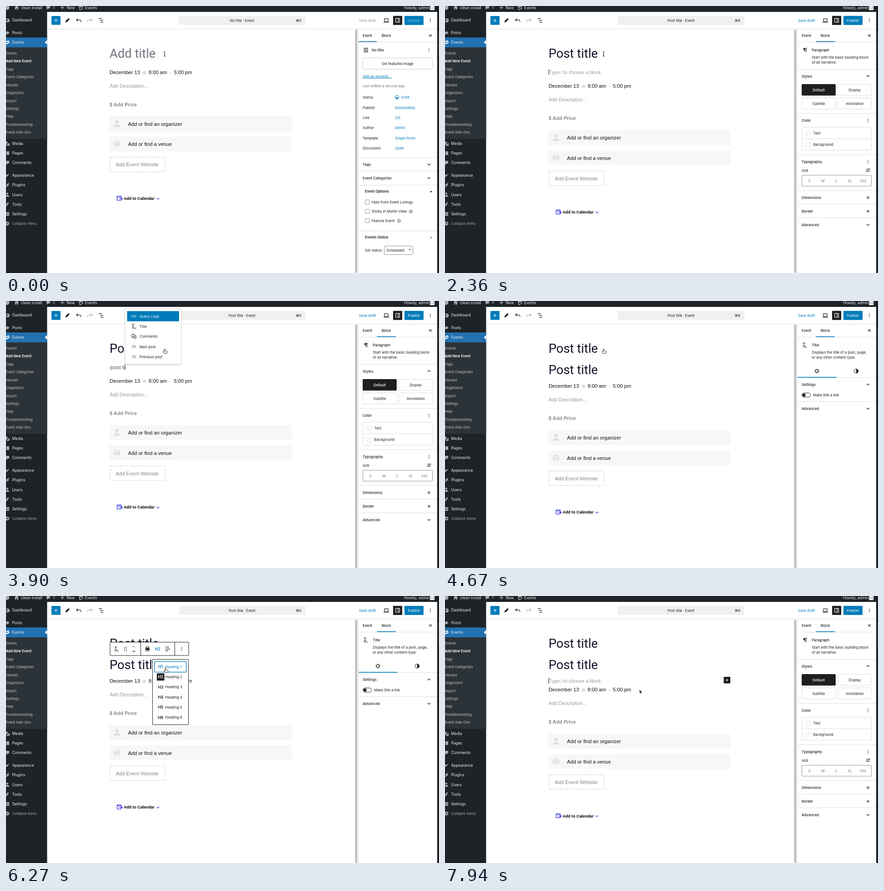
An HTML page for the animation above (8 s loop, 953 by 588 pixels).

```html
<!DOCTYPE html>
<html lang="en">
<head>
<meta charset="utf-8">
<title>Event editor</title>
<style>
html, body { margin: 0; width: 100%; height: 100%; overflow: hidden; background: #fff; }
svg { display: block; width: 953px; height: 588px; }
text { font: 7.8px Inter, sans-serif; fill: #1e1e1e; white-space: pre; }
.m { font-weight: 500; } .b { font-weight: 600; } .c { text-anchor: middle; }
.menu { font-size: 8.4px; fill: #f0f0f1; } .sub { font-size: 7.7px; fill: #c3c4c7; }
.w { fill: #fff; } .blue { fill: #007cba; } .grey { fill: #757575; } .pale { fill: #949494; } .dim { fill: #a7aaad; }
.body { font: 11.15px "Liberation Sans", Arial, sans-serif; fill: #111; }
.light { font: 11.2px "Liberation Sans", Arial, sans-serif; fill: #9b9ea4; letter-spacing: -.28px; }
.slash { font: 11.4px "Liberation Sans", Arial, sans-serif; fill: #555; }
.price { font: bold 11px "Liberation Sans", Arial, sans-serif; fill: #858b92; }
.cal { font: bold 8.8px "Liberation Sans", Arial, sans-serif; fill: #000; }
.title { font: 27.4px Roboto, sans-serif; fill: #14142b; }
.ghost { fill: #75757f; }
</style>
</head>
<body>
<svg viewBox="0 0 953 588"><g id="base"></g><g id="live"></g></svg>
<script>
const INK = '#1e1e1e', BLUE = '#007cba', LINE = '#e0e0e0';

const T = (x, y, s, c = '') => `<text x="${x}" y="${y}" dy=".36em" class="${c}">${s}</text>`;
const R = (x, y, w, h, fill, stroke = 'none', r = 0, more = '') =>
  `<rect x="${x}" y="${y}" width="${w}" height="${h}" rx="${r}" fill="${fill}" stroke="${stroke}" ${more}/>`;
const P = (x, y, d, stroke = INK, w = 1, fill = 'none') =>
  `<path transform="translate(${x} ${y})" d="${d}" stroke="${stroke}" stroke-width="${w}" fill="${fill}"/>`;
const F = (x, y, d, fill = INK) => P(x, y, d, 'none', 0, fill);
const C = (x, y, r, fill, stroke = 'none') => `<circle cx="${x}" cy="${y}" r="${r}" fill="${fill}" stroke="${stroke}"/>`;
const H = (x, y, w, col = LINE) => R(x, y, w, 1, col);
const dots = (x, y) => [-3, 0, 3].map(d => C(x, y + d, .85, INK)).join('');
const down = (x, y, col = INK) => P(x, y, 'M-3-1.5 0 1.5 3-1.5', col, 1.1);
const up = (x, y, col = INK) => P(x, y, 'M-3 1.5 0-1.5 3 1.5', col, 1.1);
const plus = (x, y, col = INK, r = 3.5) => P(x, y, `M${-r} 0H${r}M0 ${-r}V${r}`, col, 1.1);

const icons = {
  'Archives': ['M-5-4h3.5l1 1.5H5V4H-5ZM-2-.2h4M-2 2h4'],
  'Audio': ['M-.2 2.5V-4.5L3-4v1.6L.6-2.6V2.6A1.9 1.7 0 1 1-.2 1.3Z', 1],
  'Calendar': ['M-4.8-4.5h9.6v9h-9.6ZM-4.8-3h9.6M-3 0h1.4M-.7 0h1.4M1.6 0H3M-3 2.3h1.4M-.7 2.3h1.4M1.6 2.3H3'],
  'Latest Posts': ['M-4.5-4.5h9v9h-9ZM-2.7-2h1M-.8-2h3.6M-2.7 0h1M-.8 0h3.6M-2.7 2h1M-.8 2h3.6'],
  'Tag Cloud': ['M-4.5-4.5H.5L5 .2.5 4.7-4.5 0Z'],
  'Verse': ['M-3.5 5-2.6 1C-2-3 0-4.6 4-5 4-1 2 2.4-1.8 2.4L-2.6 5Z', 1],
  'Query Loop': ['M0 0C-2-2.8-4.6-2.6-4.6 0S-2 2.8 0 0 4.6-2.6 4.6 0 2 2.8 0 0Z'],
  'Title': ['M-4.5-4.5H1M-1.8-4.5V1M-4.5 1.5H1M-4.5 4.3H5'],
  'Comments': ['M-4.5-4.5H1.5V1h-4l-2 1.7ZM2.5-1.5h2V5l-1.7-1.5H-.8V1.5'],
  'Next post': ['M-4-3.2-1 0-4 3.2M.5-3.2 3.5 0 .5 3.2'],
  'Previous post': ['M4-3.2 1 0 4 3.2M-.5-3.2-3.5 0-.5 3.2']
};
const icon = (name, x, y, col = INK) => {
  const [d, solid] = icons[name] || [];
  return !d ? C(x, y, 7.5, '#fff') : solid ? F(x, y, d, col) : P(x, y, d, col);
};

function base() {
  const grey = '#a7aaad';
  let s = R(0, 0, 953, 588, '#fff') + R(0, 0, 953, 13, '#1d2327') + R(0, 13, 90.5, 575, '#1d2327')
    + R(0, 91, 90.5, 201.5, '#2c3338') + R(0, 69.3, 90.5, 21.7, '#2271b1') + F(90.5, 80, 'M0-5V5L-5 0Z', '#fff')
    + R(949, 0, 4, 588, '#1d2023') + R(951, 60, 2, 48, '#303437') + R(951.5, 61, 1.5, 1, '#aaa');
  // admin bar
  s += C(2.5, 3.5, 5, grey) + F(23.5, 3.5, 'M-5 0 0-4.5 5 0H3.5V4.5H1V1.5H-1V4.5H-3.5V0Z', grey)
    + T(33, 3.5, 'clean install', 'menu') + F(93, 2.5, 'M-4-4H4V3H0L-2.5 6V3H-4Z', grey) + T(103, 3.5, '0', 'sub')
    + P(124, 3.5, 'M-4 0H4M0-4V4', grey, 1.6) + T(133.5, 3.5, 'New', 'menu')
    + P(165, 4, 'M-4-2.5 3-4.5 4.5 1-2.5 4.5ZM-4-1 4-3', grey, 1.4) + T(174, 3.5, 'Events', 'menu')
    + T(876, 3.5, 'Howdy, admin', 'menu') + R(933, -3, 10.5, 12, '#c9ccd0')
    + F(938, 4, 'M-4.5 5C-4.5 1 4.5 1 4.5 5Z', '#fff') + C(938, 1, 2.5, '#fff');
  // admin menu
  const menu = { Dashboard: 31, Posts: 59, Events: 80, Media: 303, Pages: 324, Comments: 345, Appearance: 373, Plugins: 394, Users: 415.5, Tools: 437, Settings: 458 };
  const glyph = {
    Dashboard: 'M-3-1A4.3 4.3 0 1 1-3 2.5L1 .5 2.5-2 .2-.5Z', Posts: 'M0-4 5 0 3 1 0 4-1 2-5 5-2 1-4-1-1-2Z',
    Events: 'M-4-2 3-4.5 5 1-2 4.5-4 2 3 0 2.5-2-4 0Z', Media: 'M-4-4H1V-1H-1V3H-4ZM1 0 5-1V3.5A1.5 1.5 0 1 1 4 2V1L2 1.5V4A1.5 1.5 0 1 1 1 2.5Z',
    Pages: 'M-2-4H4V4H-2Z', Comments: 'M-4-4H4V2H1L-2 5V2H-4Z', Appearance: 'M5-4 1 1-1 3-5 4-2 1-4-2-1-1Z',
    Plugins: 'M4-4 2-2 4 0 0 3-3 5-4 4-1 2-2-1 1-3 3-5Z', Users: 'M0-4.5A2.2 2.2 0 1 1-.1-4.5ZM-4 4.5C-4-.5 4-.5 4 4.5Z',
    Tools: 'M5-3 2-1 0 2-4 5-5 4-2 0 0-4 3-5 2-3 3-2Z', Settings: 'M-4-4H4V4H-4ZM-2-2V2H-1V-2ZM1-2V2H2V-2Z'
  };
  for (const [name, y] of Object.entries(menu))
    s += F(3, y, glyph[name], name == 'Events' ? '#fff' : grey) + T(13.5, y, name, 'menu');
  s += C(3, 479, 4.3, grey) + F(3.5, 479, 'M-2.2 0 1-2.2V2.2Z', '#1d2327') + T(13.5, 479, 'Collapse menu', 'sub dim');
  ['Events', 'Add New Event', 'Tags', 'Event Categories', 'Venues', 'Organizers', 'Import', 'Settings', 'Help', 'Troubleshooting', 'Event Add-Ons']
    .forEach((name, i) => s += T(-.5, 104.2 + i * 17.43, name, i == 1 ? 'sub b w' : 'sub'));
  // editor header
  s += H(90.5, 50, 858.5) + R(100, 22, 20, 19.5, BLUE, 'none', 1) + plus(110, 31.7, '#fff')
    + F(135, 31.7, 'M-4.5 4.5-3.5 1 1.8-4.3Q3.3-5 4.4-3.6 5-2.6 4.3-1.8L-1 3.5Z')
    + P(160, 31.7, 'M-2-4-5-1-2 2M-5-1H2Q5-1 5 3.5', INK, 1.2)
    + P(184.5, 31.7, 'M2-4 5-1 2 2M5-1H-2Q-5-1-5 3.5', '#a5a5a5', 1.1)
    + P(209, 31.7, 'M-5-4H2M-2.5 0H5M-1 4H5', INK, 1.2) + R(380.5, 22, 278.5, 19.5, '#f0f0f0', 'none', 2.5)
    + T(644, 32, '⌘K', 'c') + P(837, 31.7, 'M-4-3.5H4V2.3H-4ZM-6 4H6', INK, 1.2)
    + R(852, 21.7, 20, 20, INK, 'none', 1) + P(862, 31.7, 'M-4.3-4.3H4.3V4.3H-4.3ZM1.2-4.3V4.3', '#fff', 1.2)
    + R(877, 21.7, 42, 20, BLUE, 'none', 1) + dots(934, 31.7);
  // scroll bar and panel frame
  s += R(766.5, 51, 9, 537, '#f7f7f7') + R(768.5, 52, 4.6, 536, '#bfbfbf', 'none', 2.3) + R(775, 51, 1, 537, LINE)
    + H(776, 79, 173) + T(795.5, 65, 'Event', 'm c') + T(837, 65, 'Block', 'm c') + P(934, 65, 'M-2.7-2.7 2.7 2.7M2.7-2.7-2.7 2.7', INK, 1.1);
  return s;
}

const rule = (...ys) => ys.map(y => H(776, y, 173)).join('');
const about = (name, a, b) => T(807.3, 97, name, 'm') + T(807.3, 112.7, a) + T(807.3, 124, b);

function eventPanel(title, slug) {
  let s = R(776, 77.7, 40.5, 1.6, BLUE) + P(792, 97, 'M-3.7-4.3H3.7V4.3H-3.7ZM-2-2.2H2M-2 0H2M-2 2.2H2', INK, 1.1)
    + T(805, 97, title || 'No title', 'm') + dots(931, 97) + R(785.5, 114.5, 153, 24.5, '#fff', '#ccc', 1)
    + T(862, 127, 'Set featured image', 'c') + T(785, 155, 'Add an excerpt…', 'blue') + H(785, 158.5, 63, BLUE)
    + T(785, 176, 'Last edited a second ago.', 'grey') + C(860.5, 201, 4.2, 'none', BLUE) + F(860.5, 201, 'M-3 0H3A3 3 0 0 1-3 0Z', BLUE);
  [['Status', 'Draft'], ['Publish', 'Immediately'], ['Link', slug], ['Author', 'admin'], ['Template', 'Single Posts'], ['Discussion', 'Open']]
    .forEach(([k, v], i) => s += T(785, 201.3 + i * 22.4, k) + T(i ? 856 : 870, 201.3 + i * 22.4, v, 'blue'));
  s += rule(333, 363, 394, 495) + T(785, 349, 'Tags', 'm') + down(931, 349) + T(785, 379, 'Event Categories', 'm') + down(931, 379)
    + T(790, 408.5, 'Event Options', 'b') + F(935.5, 408.5, 'M-2.7 1.5 0-1.7 2.7 1.5Z')
    + T(790, 509.5, 'Events Status', 'b') + F(935.5, 509.5, 'M-2.5 1.5 0-1.5 2.5 1.5Z', '#666');
  ['Hide From Event Listings', 'Sticky in Month View', 'Feature Event'].forEach((name, i) => {
    const y = 431.7 + i * 20.6;
    s += R(790.5, y - 4.7, 9.4, 9.4, '#fff', '#8c8f94', 2) + T(804.7, y, name);
    if (i) s += C(i == 1 ? 891 : 865, y, 4.3, '#a9abae') + T(i == 1 ? 891 : 865, y, '?', 'b c w');
  });
  return s + T(790, 538, 'Set status:') + R(832.5, 528.5, 63, 19, '#fff', '#8c8f94', 2) + T(837.5, 538.5, 'Scheduled')
    + F(889, 537, 'M-2.3-1.5H2.3L0 1.5Z', '#555');
}

const blockTab = R(816.5, 77.7, 41.5, 1.6, BLUE);

function paragraphPanel() {
  let s = blockTab + F(792, 97, 'M-1-4.5H4.5V-3.4H3.4V4.5H2.3V-3.4H.8V4.5H-.3V.5A2.6 2.5 0 0 1-1-4.5Z')
    + about('Paragraph', 'Start with the basic building block', 'of all narrative.')
    + rule(139, 236, 327, 406, 436, 466) + T(785, 155, 'Styles', 'm') + up(931, 154);
  ['Default', 'Display', 'Subtitle', 'Annotation'].forEach((name, i) => {
    const x = 785.5 + i % 2 * 79.2, y = 172.5 + (i >> 1) * 30;
    s += R(x, y, 73.8, 24.3, i ? '#fff' : INK, i ? '#ddd' : INK, 1) + T(x + 37, y + 12.4, name, i ? 'c' : 'c m w');
  });
  s += T(785, 252, 'Color', 'm') + dots(931, 252) + R(785.5, 267, 153, 50.5, '#fff', '#ddd', 1) + H(785.5, 292, 153, '#ddd');
  ['Text', 'Background'].forEach((name, i) => {
    const y = 280 + i * 25.3;
    s += C(799.3, y, 5.8, '#fff', '#ddd') + P(799.3, y, 'M-4 4 4-4', '#ddd') + T(810.5, y, name);
  });
  s += T(785, 343, 'Typography', 'm') + dots(931, 343) + `<g transform="translate(785 362.3) scale(.87)">${T(0, 0, 'SIZE', 'm')}</g>`
    + P(931, 361.5, 'M-4.5-2H4.5M-4.5 2H4.5M2-4V0M-1.5 0V4', INK, 1.2) + R(785.5, 372.8, 153, 24, '#fff', '#949494', 1);
  ['S', 'M', 'L', 'XL', 'XXL'].forEach((name, i) => s += T(802 + i * 29.8, 384.8, name, 'c grey'));
  return s + T(785, 422, 'Dimensions', 'm') + plus(931, 422) + T(785, 452, 'Border', 'm') + plus(931, 452)
    + T(785, 482, 'Advanced', 'm') + down(931, 482);
}

const titlePanel = () => blockTab + icon('Title', 792, 97)
  + about('Title', 'Displays the title of a post, page,', 'or any other content-type.')
  + C(818.5, 154.3, 2.8, 'none', INK) + `<circle cx="818.5" cy="154.3" r="4.2" fill="none" stroke="${INK}" stroke-width="1.6" stroke-dasharray="1.8 1.5"/>`
  + C(905, 154.3, 4.6, 'none', INK) + F(905, 154.3, 'M0-4.6A4.6 4.6 0 0 1 0 4.6Z')
  + rule(168, 221) + R(776, 167.3, 86, 1.6, BLUE) + T(785, 184.5, 'Settings', 'm') + up(931, 184)
  + R(785.5, 202.5, 19, 9.4, '#fff', INK, 4.7) + C(790.2, 207.2, 3.4, INK) + T(810, 207.3, 'Make title a link')
  + T(785, 237, 'Advanced', 'm') + down(931, 237);

// everything below the post title, moved down by dy
function details(dy) {
  const fill = '#f6f7f8', pale = '#dcdee0';
  return `<g transform="translate(0 ${dy})">` + T(228, 145.5, 'December 13', 'body')
    + `<g opacity=".4">${T(301, 145.8, '@')}${T(360, 145.5, '-', 'body')}</g>`
    + T(314, 145.5, '8:00 am', 'body') + T(369.5, 145.5, '5:00 pm', 'body')
    + T(228, 175.8, 'Add Description...', 'light') + T(228, 217, '$ Add Price', 'price')
    + R(228, 243, 400.5, 33, fill) + R(228, 287.7, 400.5, 32.5, fill)
    + C(244, 255.5, 3.7, pale) + F(244, 262.5, 'M-7 4C-7-3.5 7-3.5 7 4Z', pale)
    + P(244, 304, 'M-6.5-1Q-6-5.5 0-5.5T6.5-1ZM-6-1V6M-2-1V6M2-1V6M6-1V6M-6 2H6', pale, 1.8)
    + T(268.5, 259.7, 'Add or find an organizer', 'body') + T(268.5, 304.3, 'Add or find a venue', 'body')
    + R(229, 333, 121.3, 32, '#fff', '#d3d5d8', 1, 'stroke-width="1.3" stroke-dasharray="4.5 2.5"')
    + `<g opacity=".5">${T(241.7, 349.2, 'Add Event Website', 'body')}</g>`
    + P(249.5, 423.3, 'M-5-4.5H4V4.5H-5ZM-5-2.3H4M-.5 1H6.5M4.8-.8 6.7 1 4.8 2.8', '#3232e0', 1.2)
    + T(259, 424, 'Add to Calendar', 'cal') + down(334.5, 424.3, '#3232e0') + '</g>';
}

const poList = ['Tavrin Waves Embed', 'Archives', 'Audio', 'Calendar', 'Latest Posts', 'Tag Cloud', 'Verse', 'Query Loop', 'Title'];
const postList = ['Archives', 'Calendar', 'Latest Posts', 'Tag Cloud', 'Query Loop', 'Title', 'Comments', 'Next post', 'Previous post'];
const tList = ['Query Loop', 'Title', 'Comments', 'Next post', 'Previous post'];

function popup(x, text) {
  const list = text.length < 4 ? poList : text.length < 7 ? postList : text.length < 9 ? tList : ['Title'];
  const h = list.length * 22.3 + 10.3, y = list.length == 9 ? 152 : 139 - h;
  let s = R(x + 1, y + 2, 122, h + 2, '#000', 'none', 3, 'opacity=".06"') + R(x, y, 124.3, h, '#fff', '#ccc', 1.5);
  list.forEach((name, i) => {
    const cy = y + 16.3 + i * 22.3;
    if (!i) s += R(x + 5, cy - 11.2, 114.3, 22.4, BLUE, 'none', 1);
    s += icon(name, x + 20, cy, i ? INK : '#fff') + T(x + 32.3, cy + .3, name, i ? '' : 'w');
  });
  return s;
}

function toolbar(level, hot, ring) {
  let s = R(229, 101.7, 173, 29.3, '#fff', INK, 1) + R(296, 101.7, 1, 29.3, INK) + R(371, 101.7, 1, 29.3, INK) + icon('Title', 243.5, 116.7);
  for (let i = 0; i < 6; i++) s += C(261.3 + i % 2 * 3.6, 113 + (i >> 1) * 3.7, .95, INK);
  s += up(281.3, 111.5, '#999') + down(281.3, 121.8) + P(311.5, 116.7, 'M-4.5-4.3H4.5M-4.5 4.3H4.5', INK, 1.1)
    + R(307, 114.2, 9, 5, INK) + P(356, 116.7, 'M-5-4H3M-5 0H5M-5 4H1', INK, 1.2) + dots(386.8, 116.7);
  if (ring) s += R(323.5, 105.7, 21.5, 21.5, 'none', BLUE, 1);
  return s + `<g transform="translate(333.7 116.7) scale(1.1)">${T(0, 0, 'H' + level, hot ? 'b c blue' : 'b c')}</g>`;
}

function headings(hover) {
  let s = R(322.5, 139.5, 79, 143.8, '#fff', INK, 1);
  for (let i = 0; i < 6; i++) {
    const y = 156 + i * 22.3, on = i == 1, tint = i == hover ? ' blue' : '';
    if (tint) s += R(327, y - 11.6, 69.8, 23.2, '#fff', BLUE, 1, 'stroke-width="1.3"');
    if (on) s += R(332, y - 8, 16.5, 16, INK, 'none', 1);
    s += `<g transform="translate(340.3 ${y}) scale(1.1)">${T(0, 0, 'H' + (i + 1), 'b c' + (on ? ' w' : tint))}</g>`
      + T(350, y, 'Heading ' + (i + 1), tint);
  }
  return s;
}

const pointers = {
  beam: (x, y) => P(x, y, 'M-2-5Q0-5 0-3.5 0-5 2-5M0-4V4M-2 5Q0 5 0 3.5 0 5 2 5M-1.2 1H1.2', '#222', 1),
  hand: (x, y) => P(x, y, 'M-2-5Q-1-6 0-5L.3-1.5Q1.5-2.5 2-1.2 3.3-2 3.6-.6 5-.8 4.9 1L4 4.5H-1.8L-4.2 1Q-4.5-.5-3 0L-1.6 1Z', '#222', .9, '#fff'),
  arrow: (x, y) => P(x, y, 'M0 0V8.6L2 6.8 3.3 9.9 4.8 9.3 3.5 6.3H6.2Z', '#fff', .7, '#111')
};

const path = [[5090, 350, 111], [5330, 333, 128], [5600, 334, 120], [5910, 336, 128], [6270, 352, 164], [6450, 352, 162],
  [6750, 397, 120], [6860, 396, 120], [7040, 384, 118], [7480, 523, 437], [7820, 428, 206]];

function pointerAt(t) {
  const n = path.findIndex(k => k[0] > t);
  if (n <= 0) return path[n ? path.length - 1 : 0].slice(1);
  const [t0, x0, y0] = path[n - 1], [t1, x1, y1] = path[n];
  const u = (t - t0) / (t1 - t0), e = u * u * (3 - 2 * u);
  return [x0 + (x1 - x0) * e, y0 + (y1 - y0) * e];
}

// text typed so far: keystroke times and lengths
const typed = (t, word, keys) => word.slice(0, keys.filter(k => k[0] <= t).pop()?.[1] || 0);
const titleKeys = [[480, 1], [780, 3], [1310, 4], [1480, 5], [1570, 6], [1660, 7], [1750, 8], [1850, 9], [1940, 10]];
const slashKeys = [[2530, 1], [2830, 2], [2890, 3], [2940, 4], [3000, 5], [3720, 6], [3800, 7], [3880, 8], [3960, 9], [4040, 10], [4110, 11]];

const pen = document.createElement('canvas').getContext('2d');
const width = (s, font) => { pen.font = font; return pen.measureText(s).width; };
const caret = (x, y, h) => R(x, y - h / 2, 1, h, INK);

function live(t) {
  const title = typed(t, 'Post title', titleKeys), slash = typed(t, '/post title', slashKeys);
  const saved = t >= 600, writing = t >= 2240 && t < 4670, block = t >= 4670, last = t >= 7880;
  const open = t >= 5640 && t < 6480, [x, y] = pointerAt(t);
  let s = T(519.5, 32, (title || 'No title') + ' · Event', 'c') + T(795.5, 32, 'Save draft', saved ? 'c blue' : 'c pale')
    + `<g opacity="${saved ? 1 : .5}">${T(898, 32, 'Publish', 'c w')}</g>`;
  s += t < 2240 ? eventPanel(title, saved ? '/' + title.trim().toLowerCase().replace(' ', '-') : '/25')
    : block && !last ? titlePanel() : paragraphPanel();
  s += T(228, 104.3, title || 'Add title', title ? 'title' : 'title ghost') + details(last ? 60.5 : block ? 41.3 : writing ? 30.3 : 0);
  if (t >= 480 && t < 2240 && !(t >= 950 && t < 1310))
    s += caret(227.5 + width(title, '27.4px Roboto, sans-serif'), 104, 35);
  if (writing) {
    const end = 228 + width(slash, '11.4px "Liberation Sans", Arial, sans-serif');
    s += slash ? T(228, 145.5, slash, 'slash') : T(229, 145.5, 'Type / to choose a block', 'light');
    if (t < 3540 || t >= 3720) s += caret(end, 145.5, 13);
    if (slash && t >= 2590) s += popup(end, slash);
  }
  if (block) s += T(228, 150.8, title, 'title');
  if (t >= 5150 && !last) s += toolbar(t < 6480 ? 2 : 1, t < 6480 && (open || x < 346 && t > 5200), t >= 6480 && t < 6860);
  if (open) s += headings(y > 144 ? Math.floor((y - 145) / 22.3) : 0);
  if (last) s += T(229, 187, 'Type / to choose a block', 'light') + caret(228, 186.5, 13)
    + R(613.5, 178, 14.5, 14.5, INK, 'none', 1) + plus(620.7, 185.2, '#fff', 3);
  if (t < 3800) return s + pointers.beam(349, 106);
  return s + pointers[t < 7100 ? 'hand' : 'arrow'](x, y);
}

const liveNode = document.getElementById('live');
document.getElementById('base').innerHTML = base();
let shown;
function frame() {
  const markup = live(performance.now() % 8000);
  if (markup !== shown) liveNode.innerHTML = shown = markup;
  requestAnimationFrame(frame);
}
frame();
</script>
</body>
</html>
```
